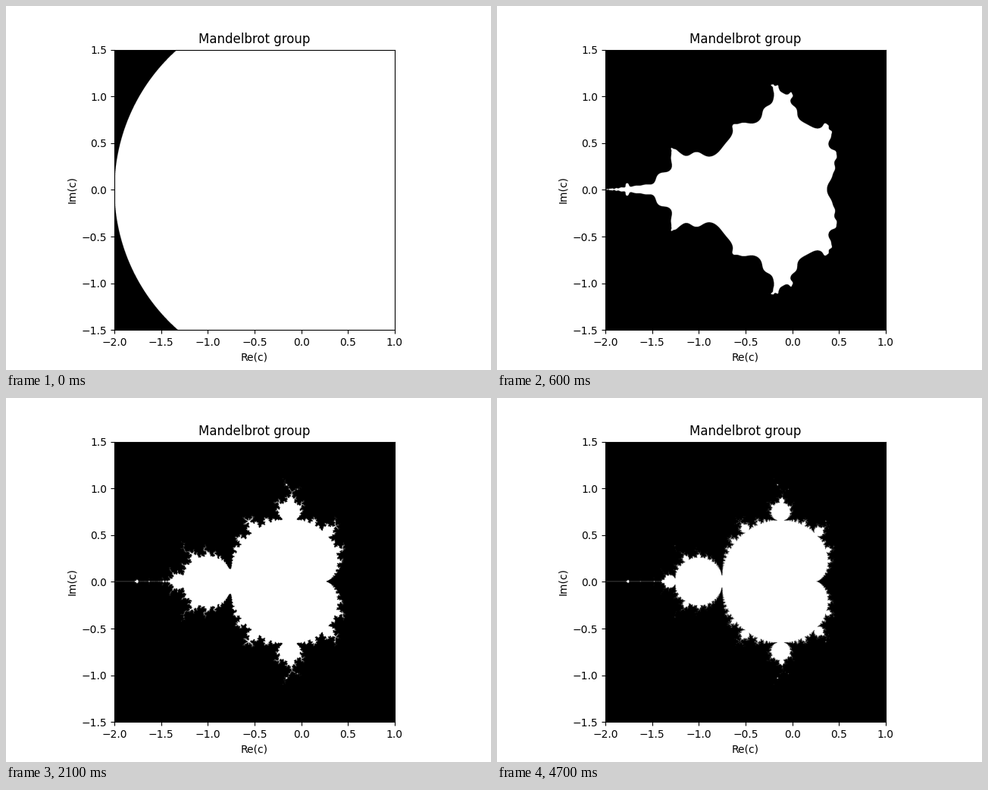
Animation of 640x480 px, one loop 4.8 s. Source, as a matplotlib script:

```python
import numpy as np
import matplotlib.pyplot as plt
from matplotlib.animation import FuncAnimation

FRAMES = 48
INTERVAL = 100
STEP = 0.002


def survival(c, limit):
    """Number of iterations each point stays within radius 2."""
    count = np.zeros(c.size, dtype=np.uint8)
    alive = np.arange(c.size)
    c0 = c.ravel()
    z = np.zeros_like(c0)
    for _ in range(limit):
        z = z * z + c0
        keep = z.real ** 2 + z.imag ** 2 <= 4
        z, c0, alive = z[keep], c0[keep], alive[keep]
        count[alive] += 1
    return count.reshape(c.shape)


re = np.arange(-2, 1, STEP)
im = np.arange(-1.5, 1.5, STEP)
count = survival(re[None, :] + 1j * im[:, None], FRAMES)

fig, ax = plt.subplots(figsize=(6.4, 4.8), dpi=100)
ax.set_title("Mandelbrot group")
ax.set_xlabel("Re(c)")
ax.set_ylabel("Im(c)")
image = ax.imshow(
    (count > 0).astype(np.float32),
    cmap="gray",
    vmin=0,
    vmax=1,
    origin="lower",
    extent=(-2, 1, -1.5, 1.5),
)


def update(i):
    image.set_data((count > i).astype(np.float32))
    return (image,)


anim = FuncAnimation(
    fig, update, frames=FRAMES, interval=INTERVAL, repeat=True, repeat_delay=0
)
plt.show()
```
